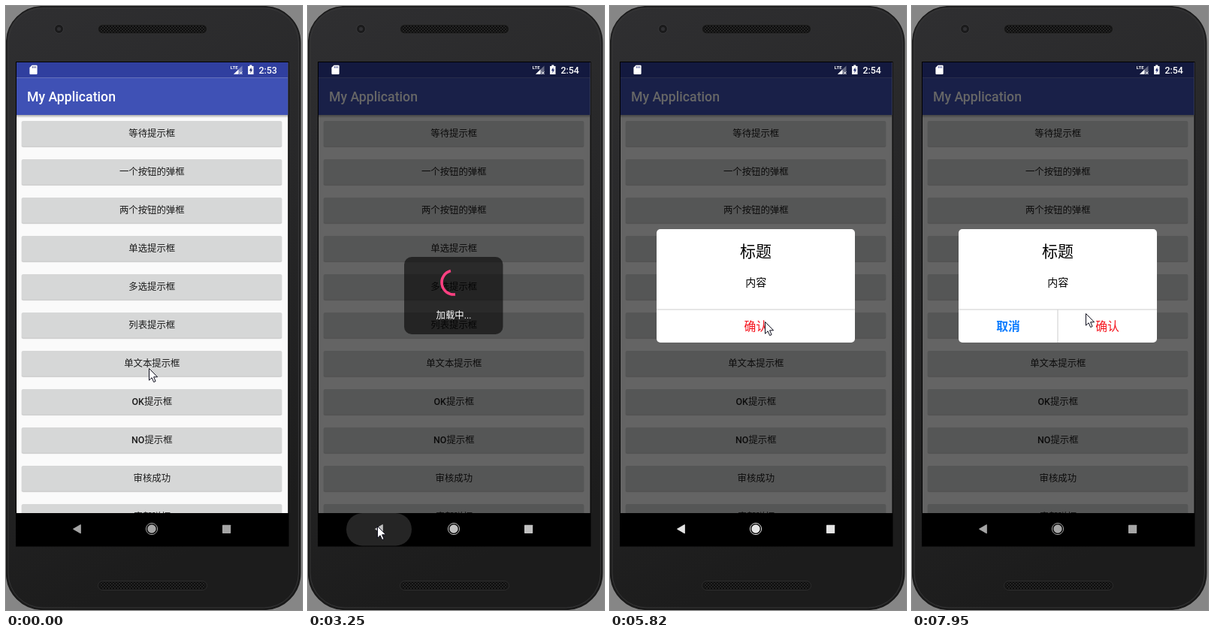
Recreate the animation shown at these times as an HTML page. Size 394 px wide and 804 px high, loop 8 s.

```html
<!DOCTYPE html>
<html lang="zh-CN">
<head>
<meta charset="utf-8">
<title>Dialogs</title>
<style>
html, body { margin: 0; width: 100%; height: 100%; overflow: hidden; background: #868686; }
svg { display: block; width: 100vw; height: 100vh; }
text { font-family: Roboto, "Noto Sans CJK SC", "Noto Sans CJK", sans-serif; }
.mid { text-anchor: middle; }
.med { font-weight: 500; }
.bold { font-weight: 700; }
</style>
</head>
<body>
<svg id="stage" viewBox="0 0 394 804" xmlns="http://www.w3.org/2000/svg"></svg>
<script>
const LOOP = 8000;
const ROWS = ["等待提示框", "一个按钮的弹框", "两个按钮的弹框", "单选提示框", "多选提示框",
  "列表提示框", "单文本提示框", "OK提示框", "NO提示框", "审核成功", "底部弹框"];
const stage = document.getElementById("stage");

const rect = (x, y, w, h, fill, more = "") =>
  `<rect x="${x}" y="${y}" width="${w}" height="${h}" fill="${fill}" ${more}/>`;
const label = (x, y, size, fill, str, cls = "mid") =>
  `<text x="${x}" y="${y}" font-size="${size}" fill="${fill}" class="${cls}">${str}</text>`;

function row(str, i) {
  const y = 153 + i * 51;
  const name = str.replace(/[A-Z]+/, s => `<tspan class="med">${s}</tspan>`);
  return rect(21, y + 2.5, 346, 33.5, "#000", `id="lift${i}" rx="3" opacity="0" filter="url(#blur)"`) +
    rect(20.3, y + .3, 347.4, 35, "#000", 'rx="2.5" opacity=".08"') +
    rect(21, y + .5, 346, 34.3, "#000", 'rx="2" opacity=".13"') +
    rect(21, y, 346, 33.7, "#d6d7d7", 'rx="2"') +
    label(194.3, y + 21, 12.4, "#1c1c1c", name);
}

const speaker = y => rect(122.5, y, 145, 12, "#151515", 'rx="6" stroke="#333" stroke-width=".8"') +
  rect(125, y + 1.5, 140, 9, "url(#mesh)", 'rx="4"');

const phone = `
  ${rect(0, 0, 394, 804, "#868686")}
  ${rect(.7, .7, 391, 802.6, "url(#shell)", 'rx="48" stroke="#181818" stroke-width="1.5"')}
  ${rect(3, 3, 386.4, 798, "none", 'rx="46" stroke="#363637" stroke-width="1"')}
  <circle cx="70.5" cy="30.5" r="6" fill="#1a1a1b" stroke="#3a3a3c"/>
  <circle cx="70.5" cy="30.5" r="2.6" fill="#303033"/>
  ${speaker(24.8)}${speaker(765.5)}
  ${rect(13, 74, 363.5, 645.5, "#000")}`;

const app = `<g clip-path="url(#app)">
  ${rect(14, 75, 361.5, 600, "#fafafa")}
  ${ROWS.map(row).join("")}
  <g clip-path="url(#first)"><circle id="ripple" cx="173.5" cy="168" fill="#000"/></g>
  ${rect(14, 145, 361.5, 4, "url(#fall)")}
  ${rect(14, 95.5, 361.5, 49.5, "#3f51b5")}
  ${rect(14, 75, 361.5, 20.5, "#303f9f")}
  ${label(28, 127, 17.7, "#fff", "My Application", "med")}
  ${rect(14, 75, 361.5, 600, "#000", 'id="dim"')}
</g>`;

const status = `<g fill="#fff">
  <path d="M34.6 78.8H40.5Q41.6 78.8 41.6 80V89.8Q41.6 91 40.5 91H32.5Q31.4 91 31.4 89.8V82Z"/>
  <path d="M35.3 80.3v2.3M37.3 80.3v2.3M39.3 80.3v2.3" stroke="#26327f" stroke-width=".9"/>
  ${label(298.8, 84, 6, "#fff", "LTE", "bold")}
  <path d="M314.5 79.5V90.8H303Z" opacity=".35"/>
  <path d="M309.5 84.4V90.8H303Z"/>
  <path d="M311 87.5l3.4 3.4M314.4 87.5l-3.4 3.4" stroke="#fff"/>
  <path d="M324.3 78.6h3v1.3h2.2V91h-7.4V79.9h2.2Z"/>
  <path d="M326.5 81.5l-2.6 4.6h1.6v3.2l2.6-4.7h-1.6Z" fill="#1c276c"/>
  <text id="clock" x="336.5" y="90" font-size="12.4" class="med"></text>
</g>`;

const nav = `
  ${rect(51, 675, 87, 43.5, "#fff", 'id="press" rx="21.5"')}
  <g id="nav">
    <path d="M89.5 696.2L99.3 690.5V701.9Z" stroke-linejoin="round"/>
    <circle cx="194" cy="696" r="7.6" style="fill:none"/>
    <circle cx="194" cy="696" r="5.7" stroke="none"/>
    <rect x="288" y="690.7" width="11.2" height="11.2" rx=".6" stroke="none"/>
  </g>`;

const loading = `<g id="loading">
  ${rect(128, 334, 131.5, 103, "#000", 'rx="10" opacity=".58"')}
  <path id="arc" fill="none" stroke="#ff4081" stroke-width="3.6"/>
  ${label(194, 415.5, 12.4, "#fff", "加载中...")}
</g>`;

const alertBox = (id, buttons) => `<g id="${id}">
  ${rect(62, 297, 264, 151, "#fff", 'rx="5"')}
  ${label(194, 334, 21, "#000", "标题")}
  ${label(194.3, 372.5, 14, "#000", "内容")}
  ${rect(62, 403.5, 264, 1, "#cdcdcd")}
  ${buttons}
</g>`;

stage.innerHTML = `<defs>
  <linearGradient id="shell" x2=".25" y2="1">
    <stop stop-color="#2f2f31"/><stop offset=".5" stop-color="#272728"/><stop offset="1" stop-color="#1c1c1c"/>
  </linearGradient>
  <linearGradient id="fall" x2="0" y2="1">
    <stop stop-color="#000" stop-opacity=".32"/><stop offset="1" stop-color="#000" stop-opacity="0"/>
  </linearGradient>
  <pattern id="mesh" width="4" height="4" patternUnits="userSpaceOnUse">
    <rect width="4" height="4" fill="#242424"/><circle cx="1" cy="1" r="1" fill="#050505"/><circle cx="3" cy="3" r="1" fill="#050505"/>
  </pattern>
  <filter id="blur" x="-5%" y="-30%" width="110%" height="160%"><feGaussianBlur stdDeviation="1.6"/></filter>
  <clipPath id="app"><rect x="14" y="75" width="361.5" height="600"/></clipPath>
  <clipPath id="first"><rect x="21" y="153" width="346" height="33.7" rx="2"/></clipPath>
</defs>` + phone + app + status + nav + loading +
  alertBox("single", label(194.3, 432, 15.8, "#f5131d", "确认")) +
  alertBox("double", rect(193.5, 404, 1, 44, "#cdcdcd") +
    label(128, 432, 15.8, "#0a7bff", "取消", "mid bold") + label(260, 432, 15.8, "#f5131d", "确认")) +
  `<path id="cursor" d="M.5 .5V16.2L4.1 12.8L6.7 18.6L9.1 17.5L6.6 11.8H11.6Z"
    fill="#fff" stroke="#0d0d1c" stroke-linejoin="round"/>`;

const $ = Object.fromEntries([...stage.querySelectorAll("[id]")].map(e => [e.id, e]));
const set = (el, attrs) => { for (const k in attrs) el.setAttribute(k, attrs[k]); };
const clamp = v => Math.max(0, Math.min(1, v));
const ramp = (t, a, b) => clamp((t - a) / (b - a));

// Linear interpolation through [time, ...values] keys
function track(t, keys) {
  const i = keys.findIndex(k => k[0] > t);
  if (i === 0) return keys[0].slice(1);
  if (i < 0) return keys[keys.length - 1].slice(1);
  const a = keys[i - 1], b = keys[i], p = ramp(t, a[0], b[0]);
  return a.slice(1).map((v, n) => v + (b[n + 1] - v) * p);
}

// cubic-bezier(.4, 0, .2, 1)
function ease(x) {
  let lo = 0, hi = 1;
  for (let i = 0; i < 20; i++) {
    const s = (lo + hi) / 2, r = 1 - s;
    if (1.2 * r * r * s + .6 * r * s * s + s * s * s < x) lo = s; else hi = s;
  }
  return lo * lo * (3 - 2 * lo);
}

const tick = t => t < 1134 ? Math.max(0, 130 + 140 * Math.floor((t - 130) / 140))
  : 1134 + 151 * Math.floor((t - 1134) / 151);

const CURSOR = [
  [0, 190, 482], [130, 187, 425], [270, 174, 270], [410, 165, 185], [550, 167, 167],
  [2050, 167, 167], [2350, 148, 300], [2650, 110, 580], [2950, 92, 692],
  [3450, 92, 692], [3700, 120, 570], [4000, 185, 290], [4155, 199, 231], [4300, 203, 222],
  [5080, 203, 222], [5360, 204, 290], [5660, 206, 410], [5815, 206, 420],
  [6120, 206, 420], [6420, 203, 290], [6570, 202, 269],
  [7627, 202, 269], [7929, 231, 409]
];
const NAV = [[3100, 165], [3248, 192], [3400, 255], [5080, 255], [5815, 228], [6570, 165]];

const DIALOGS = [
  { el: $.loading, row: 0, open: 1134, close: 3248 },
  { el: $.single, row: 1, open: 4607, close: 5815 },
  { el: $.double, row: 2, open: 7476, close: 9000 }
];

function arc(t) {
  const p = (t - 1040) / 1333 % 1;
  const spin = 58 + .17 * (t - 1440) + 90 * p;
  const at = turn => {
    const a = (spin + 360 * turn) * Math.PI / 180;
    return `${194 + 16 * Math.sin(a)} ${368 - 16 * Math.cos(a)}`;
  };
  const from = .75 * ease(clamp(2 * p - 1)), to = .03 + .75 * ease(clamp(2 * p));
  return `M${at(from)}A16 16 0 ${to - from > .5 ? 1 : 0} 1 ${at(to)}`;
}

function draw(time) {
  const t = tick(time);
  let dim = 0;
  for (const d of DIALOGS) {
    const enter = ramp(t, d.open, d.open + 300);
    const show = enter * (1 - ramp(t, d.close, d.close + 315));
    const scale = .9 + .1 * enter;
    dim = Math.max(dim, show);
    set(d.el, {
      opacity: show,
      transform: `translate(194 380) scale(${scale}) translate(-194 -380)`
    });
    set($["lift" + d.row], { opacity: t >= d.open && t < d.open + 300 ? .2 : 0 });
  }
  set($.dim, { opacity: .6 * dim });

  const age = t - 1134;
  set($.ripple, {
    r: age > 0 ? 25 + age * .13 : 0,
    opacity: .12 * (age > 0 ? 1 - ramp(age, 302, 620) : 0)
  });
  if (t > 1134 && t < 3700) set($.arc, { d: arc(t) });

  $.clock.textContent = t < 2640 ? "2:53" : "2:54";
  set($.press, { opacity: t < 3248 ? 0 : .145 * (1 - ramp(t, 3390, 3700)) });
  const g = Math.round(track(t, NAV)[0]), tone = `rgb(${g},${g},${g})`;
  set($.nav, { fill: tone, stroke: tone });
  const [x, y] = track(t, CURSOR);
  set($.cursor, { transform: `translate(${Math.round(x)} ${Math.round(y)})` });
}

let start;
function loop(now) {
  start ??= now;
  draw((now - start) % LOOP);
  requestAnimationFrame(loop);
}
draw(0);
requestAnimationFrame(loop);
</script>
</body>
</html>
```
